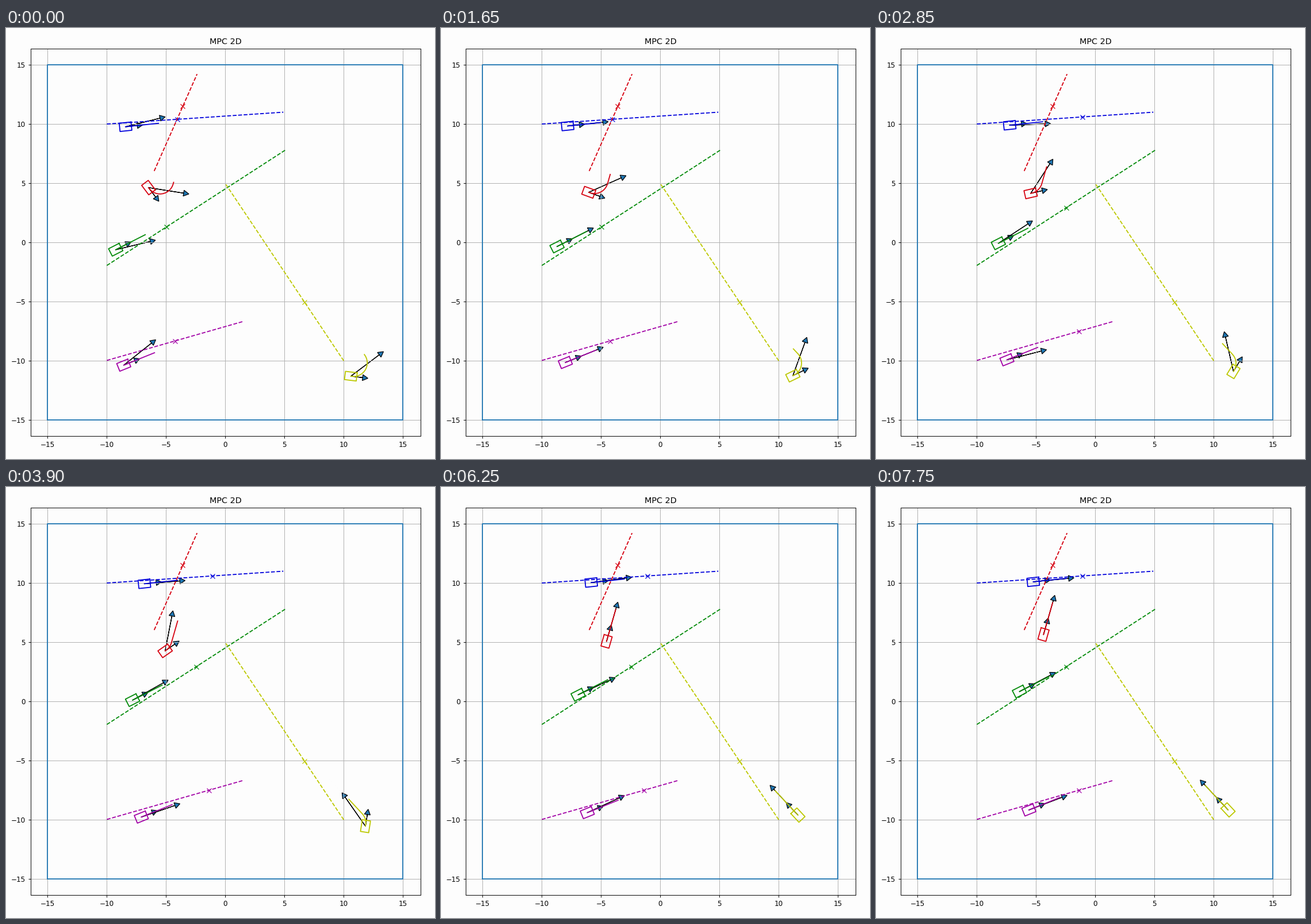
A matplotlib script that plays this animation: 746x750 px, repeating every 8000 ms.

```python
import numpy as np
import matplotlib.pyplot as plt
from matplotlib.animation import FuncAnimation

W, H = 746, 750
PT = 0.72                      # points per pixel at 100 dpi
UNIT = 20.6                    # pixels per data unit
CX, CY = 381.3, 373.1          # pixel position of the data origin
LEFT, RIGHT, TOP, BOTTOM = 42.5, 720.6, 36.2, 710.2
PAPER, BLUE = "#fdfdfd", "#1f77b4"

TICK_MS = 50
LOOP_MS = 8000
# the solver takes a slightly different time for every step
STEP_TIMES = [300, 750, 1250, 1700, 2250, 2850, 3300, 3900, 4400,
              4800, 5300, 5750, 6250, 6750, 7200, 7750]
STEPS = np.arange(len(STEP_TIMES) + 1)

STRIDE = 0.2                   # distance covered in one step
HORIZON = np.arange(14)        # predicted steps
TURN, PLAN_TURN = 11, 10       # degrees per step, driven and predicted
MAX_LEAD = 44                  # how far the force may point off the heading
REACH = 3.65                   # distance at which the next waypoint is taken
LENGTH, WIDTH = 1.0, 0.7
LINE = 1.8 * PT

# aim: first and final heading; marks: waypoints as fractions of the path;
# sway: first swing of the force around the heading
CARS = [
    dict(color="#0000dc", start=(-8.42, 9.77), aim=(6, 6), sway=8,
         path=[(-10, 10), (4.9, 11)], marks=[2 / 5, 3 / 5]),
    dict(color="#d6000f", start=(-6.48, 4.63), aim=(-53, 74), sway=0,
         path=[(-6, 6.03), (-2.38, 14.22)], marks=[2 / 3]),
    dict(color="#008a08", start=(-9.25, -0.62), aim=(27, 27), sway=-13.5,
         path=[(-10, -1.95), (5.07, 7.8)], marks=[1 / 3, 1 / 2]),
    dict(color="#a200a6", start=(-8.57, -10.37), aim=(22, 22), sway=16.5,
         path=[(-10, -9.97), (1.5, -6.68)], marks=[1 / 2, 3 / 4]),
    dict(color="#bcc800", start=(10.6, -11.3), aim=(-7, 133), sway=0,
         path=[(10, -10), (0.05, 4.9)], marks=[1 / 3]),
]


def unit(deg):
    a = np.radians(deg)
    return np.stack([np.cos(a), np.sin(a)], axis=-1)


def steer(heading, goal, steps, rate):
    """Headings while turning to the goal at a limited rate."""
    turn = goal - heading
    return heading + np.sign(turn) * np.minimum(steps * rate, abs(turn))


def walk(start, headings):
    """Positions after moving one stride along each heading in turn."""
    moves = np.cumsum(STRIDE * unit(headings), axis=0)
    return np.vstack([start, np.add(start, moves)])


def force_angle(heading, goal, sway):
    lead = np.clip(5 * (goal - heading), -MAX_LEAD, MAX_LEAD)
    return heading + lead + sway * 0.88 ** STEPS * np.cos(STEPS * np.pi / 6)


def waypoints(path, fractions, pos):
    """The waypoint being followed at each step."""
    a, b = np.array(path)
    points = [a + f * (b - a) for f in fractions]
    reached = np.hypot(*(pos - points[0]).T) < REACH
    index = np.minimum(np.maximum.accumulate(reached), len(points) - 1)
    return [points[i] for i in index]


def outline(pos, heading):
    ahead = unit(heading) * LENGTH / 2
    side = unit(heading + 90) * WIDTH / 2
    corners = [ahead + side, ahead - side, -ahead - side, -ahead + side, ahead + side]
    return pos + np.array(corners)


def make_arrow():
    return ax.arrow(0, 0, 1, 0, width=0.001, head_width=0.5, head_length=0.45,
                    fc=BLUE, ec="black", lw=1.2 * PT)


def point(arrow, pos, vec):
    arrow.set_data(x=pos[0], y=pos[1], dx=vec[0], dy=vec[1])


fig = plt.figure(figsize=(W / 100, H / 100), dpi=100, facecolor=PAPER)
ax = fig.add_axes([LEFT / W, 1 - BOTTOM / H, (RIGHT - LEFT) / W, (BOTTOM - TOP) / H],
                  facecolor=PAPER)
ax.set_title("MPC 2D", fontsize=14.4 * PT, pad=8 * PT)
ax.tick_params(labelsize=12 * PT, length=4.2 * PT, width=0.96 * PT, pad=4.2 * PT)
ax.grid(color="#b0b0b0", lw=0.96 * PT)
for spine in ax.spines.values():
    spine.set_linewidth(0.96 * PT)
ax.plot([-15, 15, 15, -15, -15], [-15, -15, 15, 15, -15], color=BLUE, lw=LINE)

for car in CARS:
    color, (first, goal) = car["color"], car["aim"]
    car["heading"] = steer(first, goal, STEPS, TURN)
    car["force"] = force_angle(car["heading"], goal, car["sway"])
    car["pos"] = walk(car["start"], car["heading"][:-1])
    car["target"] = waypoints(car["path"], car["marks"], car["pos"])
    ax.plot(*zip(*car["path"]), "--", color=color, lw=LINE)
    car["mark"], = ax.plot([], [], "x", color=color, ms=7.2 * PT, mew=1.2 * PT)
    car["body"], = ax.plot([], [], color=color, lw=LINE)
    car["plan"], = ax.plot([], [], color=color, lw=LINE)
    car["arrows"] = make_arrow(), make_arrow()

ax.set_xlim((LEFT - CX) / UNIT, (RIGHT - CX) / UNIT)
ax.set_ylim((CY - BOTTOM) / UNIT, (CY - TOP) / UNIT)
ax.set_xticks(range(-15, 16, 5))
ax.set_yticks(range(-15, 16, 5))


def draw(i):
    s = int(np.searchsorted(STEP_TIMES, i * TICK_MS, side="right"))
    for car in CARS:
        pos, heading, goal = car["pos"][s], car["heading"][s], car["aim"][1]
        plan = walk(pos, steer(heading, goal, HORIZON, PLAN_TURN))
        car["mark"].set_data(*car["target"][s][:, None])
        car["body"].set_data(*outline(pos, heading).T)
        car["plan"].set_data(*plan.T)
        near, far = car["arrows"]
        point(near, pos, unit(heading))
        point(far, pos, 3 * unit(car["force"][s]))
    return []


anim = FuncAnimation(fig, draw, frames=LOOP_MS // TICK_MS, interval=TICK_MS,
                     init_func=lambda: draw(0), repeat=True, repeat_delay=0)
plt.show()
```
